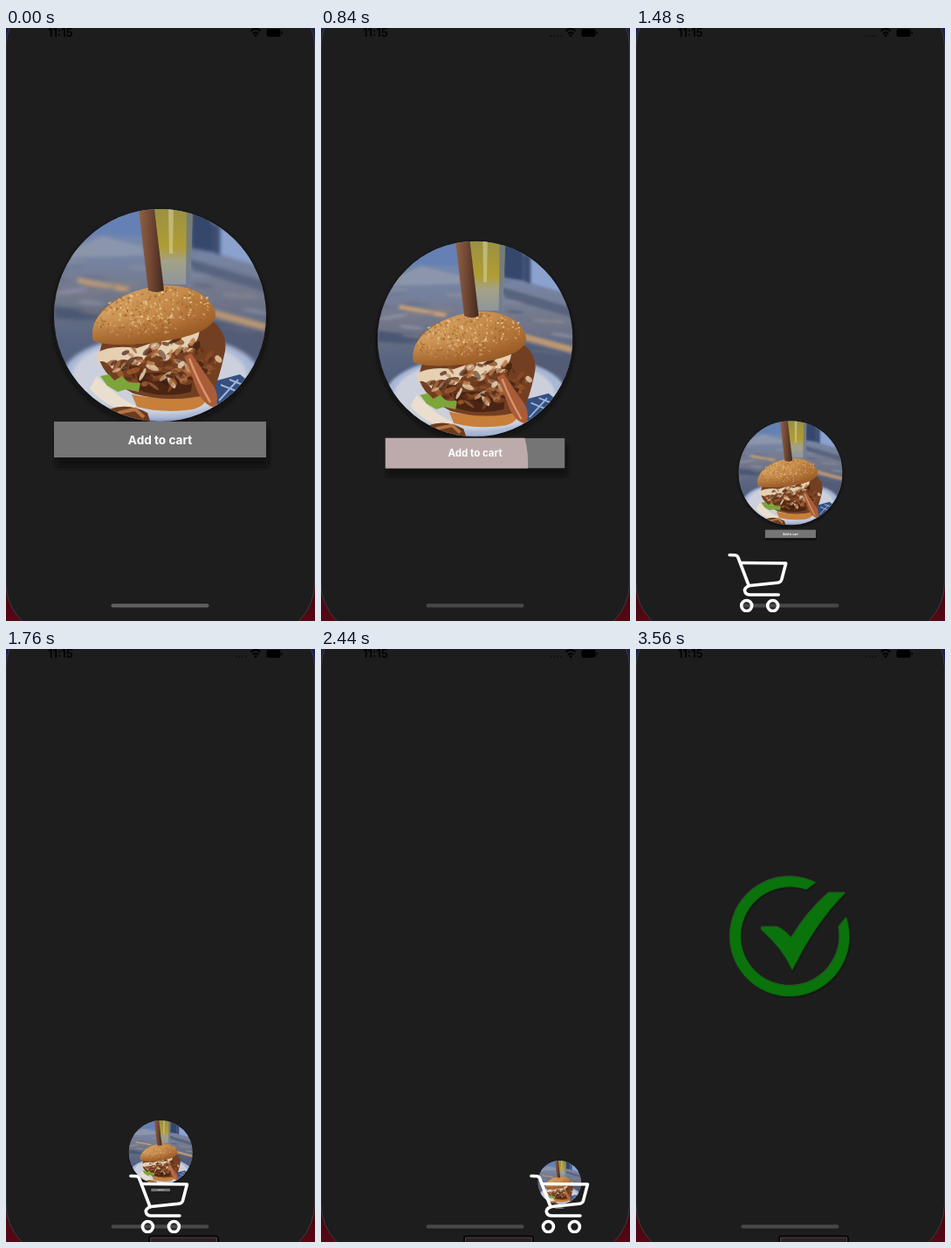
These frames come from a looping animation (354x678 px, 3600 ms). An HTML page:

```html
<!DOCTYPE html>
<html lang="en">
<head>
<meta charset="utf-8">
<title>Add to cart</title>
<style>
html, body { margin: 0; width: 100%; height: 100%; overflow: hidden; background: #1d1d1d; }
svg { display: block; width: 100%; height: 100%; }
text { font-family: Inter, Roboto, sans-serif; }
</style>
</head>
<body>
<svg viewBox="0 0 354 678" xmlns="http://www.w3.org/2000/svg">
  <defs>
    <linearGradient id="desk" x1="0" y1="0" x2="0" y2="1">
      <stop offset="0" stop-color="#6f88b8"/><stop offset=".2" stop-color="#7686a6"/>
      <stop offset=".4" stop-color="#74788a"/><stop offset=".6" stop-color="#596580"/>
      <stop offset="1" stop-color="#3f4e78"/>
    </linearGradient>
    <linearGradient id="bun" x1="0" y1=".1" x2="1" y2=".7">
      <stop offset="0" stop-color="#d9a766"/><stop offset=".55" stop-color="#c58a4a"/>
      <stop offset="1" stop-color="#9c5c26"/>
    </linearGradient>
    <linearGradient id="bunShade" x1="0" y1="0" x2="0" y2="1">
      <stop offset=".55" stop-color="#8a4a18" stop-opacity="0"/>
      <stop offset="1" stop-color="#8a4a18" stop-opacity=".65"/>
    </linearGradient>
    <linearGradient id="beer" x1="0" y1="0" x2="0" y2="1">
      <stop offset="0" stop-color="#9a9142"/><stop offset=".5" stop-color="#b09c34"/>
      <stop offset=".7" stop-color="#a3a288"/><stop offset="1" stop-color="#8f959c"/>
    </linearGradient>
    <linearGradient id="stick" x1="0" y1="0" x2="1" y2="0">
      <stop offset="0" stop-color="#8f6245"/><stop offset=".5" stop-color="#704632"/>
      <stop offset="1" stop-color="#412820"/>
    </linearGradient>
    <linearGradient id="edge" x1="0" y1="0" x2="0" y2="1">
      <stop offset="0" stop-color="#1c1c58"/><stop offset=".5" stop-color="#222230"/>
      <stop offset=".93" stop-color="#3c0610"/><stop offset="1" stop-color="#560814"/>
    </linearGradient>
    <filter id="soft" x="-20%" y="-20%" width="140%" height="150%"><feGaussianBlur stdDeviation="2.5"/></filter>
    <filter id="haze"><feGaussianBlur stdDeviation="2"/></filter>
    <clipPath id="plateClip"><circle cx="176.5" cy="328.5" r="121.5"/></clipPath>
    <clipPath id="btnClip"><rect x="-121.5" y="-20.5" width="243" height="41"/></clipPath>
    <clipPath id="pageClip"><path d="M20 0H334V638A30 30 0 0 1 304 668H50A30 30 0 0 1 20 638Z"/></clipPath>
    <clipPath id="wipe"><rect id="wipeRect" x="100" y="250" width="0" height="160"/></clipPath>
    <path id="bunShape" d="M100 357C93 328 130 302 168 296C206 288 241 307 240 330C236 345 212 352 192 356C150 363 112 364 100 357Z"/>
    <path id="mark" d="M206 267A68.5 68.5 0 1 0 241 307L232 318A56.5 56.5 0 1 1 195 275Z
      M144 317.5L162 317.5Q170 321 178 330Q196 300 221 278.5L240 278.5Q206 312 179 367Q168 342 143.5 321Z"/>
  </defs>

  <rect width="354" height="678" fill="url(#edge)"/>
  <rect x="0" y="-39" width="353.5" height="734" rx="60" fill="#1d1d1d" stroke="#3c3c40"/>

  <text x="48" y="10" font-size="13" font-weight="600">11:15</text>
  <g id="dots" fill="#101010"></g>
  <path d="M280.5 3.5Q286 -1.5 291.500 3.5M283 6.5Q286 3.500 289 6.500" fill="none" stroke="#000" stroke-width="2"/>
  <path d="M284 8Q286 6.5 288 8L286 10.5Z"/>
  <rect x="298.5" y="1" width="16" height="9" rx="2.5"/>
  <rect x="315.5" y="4" width="1.5" height="3" rx=".7"/>

  <g clip-path="url(#pageClip)">
    <g id="dish">
      <circle cx="176.5" cy="332.5" r="123" fill="#0c0c0c" opacity=".75" filter="url(#soft)"/>
      <g clip-path="url(#plateClip)">
        <rect x="55" y="207" width="243" height="243" fill="url(#desk)"/>
        <g filter="url(#haze)">
          <path d="M55 200H160V238L100 236L55 258Z" fill="#6580b4"/>
          <path d="M212 200H236V256L212 252Z" fill="#34466c"/>
          <path d="M236 200H300V275L236 256Z" fill="#8ba2cf"/>
          <path d="M236 222L246 226V260L236 256Z" fill="#3d4e72"/>
          <path d="M55 262L110 238L158 250L158 260L90 262Z" fill="#8b96ac"/>
          <path d="M55 318L140 328L140 338L55 332Z" fill="#4c5874"/>
          <path d="M82 286L142 297L138 302L82 291Z" fill="#c79f73"/>
          <path d="M210 264L298 290V302L210 276Z" fill="#59647e"/>
          <path d="M238 322L298 338V346L238 330Z" fill="#bb9873"/>
          <path d="M238 334L298 348V380L238 360Z" fill="#525c76"/>
          <g id="grain"></g>
          <ellipse cx="178" cy="400" rx="114" ry="50" fill="#a9b7d6"/>
          <ellipse cx="176" cy="398" rx="100" ry="44" fill="#ccd0dc"/>
        </g>
        <path d="M238 404L268 396L290 414L262 436L240 430Z" fill="#35507f"/>
        <path d="M246 408L276 420M256 402L282 412M244 426L266 402M258 430L280 408" stroke="#9fb4da" stroke-width="2"/>
        <path d="M170 207H214L211 293H177Z" fill="url(#beer)"/>
        <path d="M186 207H192L191 258H187Z" fill="#d4cf9a" opacity=".6"/>
        <path d="M207 207H214L211 293H206Z" fill="#637392" opacity=".7"/>
        <path d="M104 398Q130 425 150 432L142 440Q112 432 96 412Z" fill="#eadfce"/>
        <path d="M144 419Q185 428 231 414Q232 432 214 436Q180 441 150 433Z" fill="#c77f3a"/>
        <path d="M112 352Q170 366 238 336Q256 352 250 374Q244 402 236 418Q190 430 146 418Q112 400 106 376Z" fill="#733f22"/>
        <path d="M150 396Q185 390 214 400L212 416Q180 424 152 414Z" fill="#4b2413"/>
        <path d="M104 372Q118 362 150 366L190 352L222 344Q220 364 210 360Q206 378 200 366Q186 368 180 378Q170 370 160 376Q150 394 140 380Q126 376 122 390Q114 378 104 382Z" fill="#e6d0b2"/>
        <g id="filling"></g>
        <path d="M204 376Q214 400 218 412Q226 432 240 434Q246 418 234 404Q222 386 212 372Z" fill="#a95c38"/>
        <path d="M210 378Q220 404 234 428" fill="none" stroke="#d8946c" stroke-width="2.5"/>
        <path d="M108 398L118 396L124 403L133 398L140 405L154 406L152 416L138 413L128 416L116 409Z" fill="#7da53a"/>
        <path d="M118 436Q140 428 162 440L166 452H122Z" fill="#6b3b20"/>
        <path d="M128 440L148 436L158 445" fill="none" stroke="#b67441" stroke-width="4"/>
        <use href="#bunShape" fill="url(#bun)"/>
        <g id="seeds"></g>
        <use href="#bunShape" fill="url(#bunShade)"/>
        <path d="M152 207H170L181 300Q172 304 163 300Z" fill="url(#stick)"/>
      </g>
    </g>
    <g id="button">
      <rect x="-119" y="-12" width="243" height="43" fill="#0c0c0c" opacity=".75" filter="url(#soft)"/>
      <g clip-path="url(#btnClip)">
        <rect x="-121.5" y="-20.5" width="243" height="41" fill="#757575"/>
        <circle id="ripple" cx="-47" cy="12" fill="#bdabab"/>
      </g>
      <text y="5" font-size="13.6" font-weight="700" fill="#fff" text-anchor="middle">Add to cart</text>
    </g>
    <g id="cart" fill="none" stroke="#fff" stroke-width="3.6" stroke-linecap="round" stroke-linejoin="round">
      <path d="M1 602.5L7.500 602.800Q10 603 11 606L23 637.500"/>
      <path d="M13.500 611.500L65.500 612L60.500 631Q59.500 633.800 56 634.200L24.500 637.500Q17.500 639.500 18.500 644Q19.500 648 24.500 648H57"/>
      <circle cx="20.500" cy="660.500" r="6"/><circle cx="50.500" cy="660.500" r="6"/>
    </g>
  </g>

  <g id="done" clip-path="url(#wipe)">
    <use href="#mark" x="1.5" y="2" fill="#101a10"/>
    <use href="#mark" x="-.5" y="-.8" fill="#3c5a3c"/>
    <use href="#mark" fill="#0b730b" stroke="#0e5a10" stroke-width=".8"/>
  </g>

  <g id="hint">
    <rect x="164" y="671.5" width="79" height="14" rx="2.5" fill="#2b2224" stroke="#050505" stroke-width="2"/>
    <path d="M165.5 678V673H241.5V678" fill="none" stroke="#56484b" stroke-width=".8"/>
  </g>
  <rect id="homeBar" x="120.5" y="658.3" width="112" height="4.2" rx="2.1" fill="#fff"/>
</svg>
<script>
const LOOP = 3600, CX = 176.5, CY = 328.5;
const $ = id => document.getElementById(id);
const set = (id, attrs) => { for (const k in attrs) $(id).setAttribute(k, attrs[k]); };
const span = (t, a, b) => Math.min(1, Math.max(0, (t - a) / (b - a)));
const mix = (a, b, p) => a + (b - a) * p;
const add = (id, tag, attrs) => {
  const el = document.createElementNS('http://www.w3.org/2000/svg', tag);
  for (const k in attrs) el.setAttribute(k, attrs[k]);
  $(id).appendChild(el);
};

let seed = 11;
const rnd = () => (seed = seed * 16807 % 2147483647) / 2147483647;

// random flecks inside a sheared ellipse
function scatter(id, n, { x, y, w, h, slope, rx, ry, spin, colors }) {
  for (let i = 0; i < n; i++) {
    const a = rnd() * Math.PI * 2, r = Math.sqrt(rnd());
    const dx = Math.cos(a) * r * w, px = x + dx, py = y + Math.sin(a) * r * h + dx * slope;
    add(id, 'ellipse', {
      cx: px, cy: py, rx: rx * (.6 + rnd() * .8), ry: ry * (.6 + rnd() * .8),
      fill: colors[Math.floor(rnd() * colors.length)], opacity: .4 + rnd() * .5,
      transform: `rotate(${(rnd() - .5) * spin} ${px} ${py})`
    });
  }
}
scatter('grain', 45, { x: 176, y: 305, w: 125, h: 55, slope: .12, rx: 16, ry: 1.8, spin: 20,
  colors: ['#8d93a4', '#566078', '#857f82', '#6b738a'] });
scatter('filling', 110, { x: 179, y: 384, w: 65, h: 27, slope: -.12, rx: 6, ry: 2.6, spin: 150,
  colors: ['#5a2c16', '#3e1e12', '#a8612f', '#c58a58', '#e6d0b2', '#8a4a26'] });
scatter('seeds', 330, { x: 170, y: 325, w: 66, h: 27, slope: -.12, rx: 1.6, ry: 1, spin: 180,
  colors: ['#efd3a0', '#e4bd83', '#b0702f', '#9c5f28'] });

for (let i = 0; i < 4; i++) add('dots', 'circle', { cx: 263.5 + i * 3.8, cy: 9, r: 1 });

function draw(t) {
  // the dish shrinks and drops, then rides off with the cart
  const drop = span(t, 722, 1904);
  const ride = Math.max(0, t - 1944) * .193;
  const s = mix(1, 25 / 121.5, drop);
  const x = CX + ride + drop * .8, y = mix(CY, 610, span(t, 728, 1904));
  set('dish', { transform: `translate(${x} ${y}) scale(${s}) translate(${-CX} ${-CY})` });
  set('button', { transform: `translate(${x} ${y + 142 * s}) scale(${s * s})` });

  set('ripple', {
    r: 118 * span(t, 600, 840) + 90 * span(t, 840, 1000),
    opacity: 1 - span(t, 880, 1130)
  });

  const left = 1 - span(t, 722, 1847);
  set('cart', { transform: `translate(${144 - 357 * left * left + ride} 0)` });

  set('wipeRect', { width: 8 + 145 * span(t, 2620, 2955) });
  set('done', { opacity: span(t, 2620, 3240) });

  set('hint', { opacity: t >= 1760 ? 1 : 0 });
  set('dots', { opacity: t >= 40 ? 1 : 0 });
  set('homeBar', { opacity: mix(.3, .19, span(t, 0, 560)) });
}

const start = performance.now();
function tick() {
  draw((performance.now() - start) % LOOP);
  requestAnimationFrame(tick);
}
draw(0);
tick();
</script>
</body>
</html>
```
